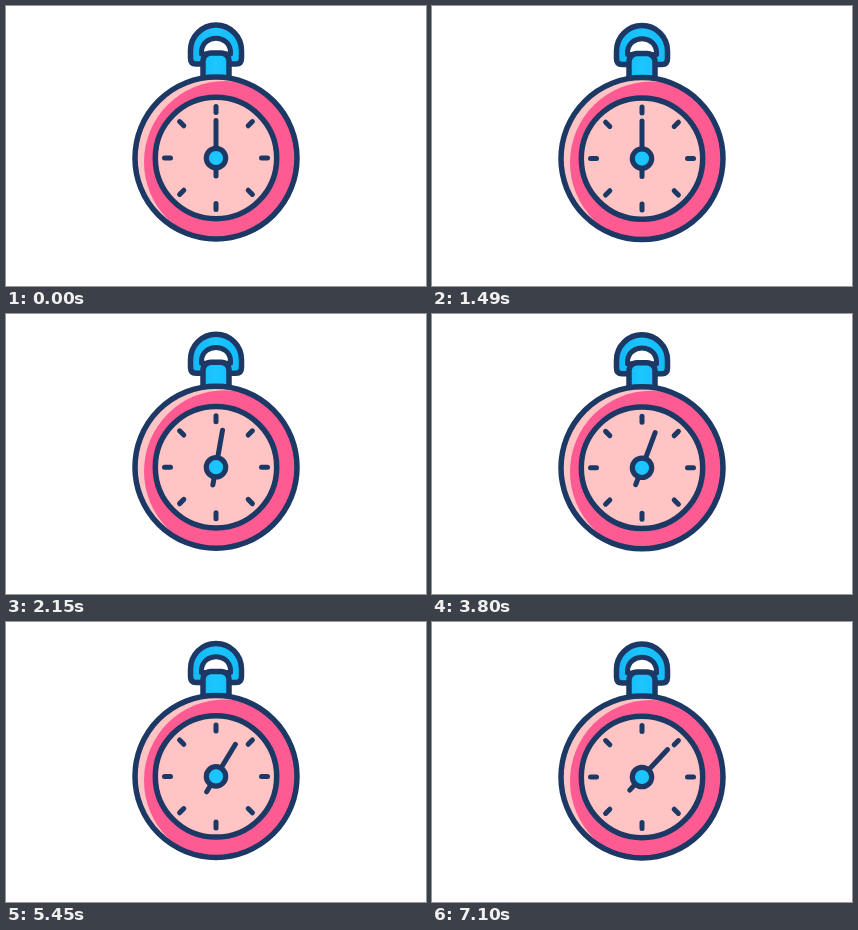
Write an HTML page with a canvas that moves like this. It is 420x280 px and loops after 8 s.

```html
<!DOCTYPE html>
<html lang="en">
<head>
<meta charset="utf-8">
<title>Stopwatch</title>
<style>
  html, body { margin: 0; width: 100%; height: 100%; overflow: hidden; background: #fff; }
  canvas { display: block; width: 420px; height: 280px; }
</style>
</head>
<body>
<canvas id="stage" width="420" height="280"></canvas>
<script>
const ctx = document.getElementById('stage').getContext('2d');
const NAVY = '#1c3865', PINK = '#ff5b93', PALE = '#ffc4c3';
const LOOP = 8000, FIRST = 500, STEP = 1650;
const ANGLES = [0, 0, 10, 20.5, 31.2, 43];

const cyan = ctx.createLinearGradient(-28, 0, 28, 0);
cyan.addColorStop(0, '#12b4f4');
cyan.addColorStop(0.5, '#1cc6ff');
cyan.addColorStop(1, '#12b9f8');

function paint(fill, width) {
  if (fill) {
    ctx.fillStyle = fill;
    ctx.fill();
  }
  if (width) {
    ctx.strokeStyle = NAVY;
    ctx.lineWidth = width;
    ctx.stroke();
  }
}

function circle(x, y, r, fill, width) {
  ctx.beginPath();
  ctx.arc(x, y, r, 0, Math.PI * 2);
  paint(fill, width);
}

function line(angle, from, to, width) {
  const s = Math.sin(angle), c = -Math.cos(angle);
  ctx.beginPath();
  ctx.moveTo(s * from, c * from);
  ctx.lineTo(s * to, c * to);
  paint(null, width);
}

function drawRing() {
  ctx.beginPath();
  ctx.moveTo(-15, -94);
  ctx.lineTo(-20, -94);
  ctx.quadraticCurveTo(-25.5, -94, -25.5, -100);
  ctx.lineTo(-25.5, -107.5);
  ctx.arc(0, -107.5, 25.5, Math.PI, 0);
  ctx.lineTo(25.5, -100);
  ctx.quadraticCurveTo(25.5, -94, 20, -94);
  ctx.lineTo(15, -94);
  ctx.closePath();
  paint(cyan, 5.5);

  ctx.beginPath();
  ctx.moveTo(-14.5, -104);
  ctx.lineTo(-14.5, -107);
  ctx.bezierCurveTo(-13, -124, 13, -124, 14.5, -107);
  ctx.lineTo(14.5, -104);
  ctx.closePath();
  paint('#fff', 5);

  ctx.beginPath();
  ctx.roundRect(-13, -105, 26, 34, [8, 8, 0, 0]);
  paint(cyan, 5.5);
}

function drawBody() {
  circle(0, 0, 81, PALE);
  ctx.save();
  ctx.clip();
  circle(9, 4, 81, PINK);
  ctx.restore();
  circle(0, 0, 81, null, 5.5);
  circle(0, 0, 60.7, PALE, 5.5);
  for (let i = 0; i < 8; i++) line(i * Math.PI / 4, 45.5, 51.5, 5);
}

function drawHand(angle) {
  line(angle, -18, 37.5, 5);
  circle(0, 0, 9.7, cyan, 5.2);
}

function draw(t) {
  const i = t < FIRST ? 0 : 1 + Math.floor((t - FIRST) / STEP);
  ctx.fillStyle = '#fff';
  ctx.fillRect(0, 0, 420, 280);
  ctx.save();
  ctx.translate(210, 152 + i * 0.6);
  ctx.lineCap = ctx.lineJoin = 'round';
  drawRing();
  drawBody();
  drawHand(ANGLES[i] * Math.PI / 180);
  ctx.restore();
}

const start = performance.now();
function tick() {
  draw((performance.now() - start) % LOOP);
  requestAnimationFrame(tick);
}
tick();
</script>
</body>
</html>
```
